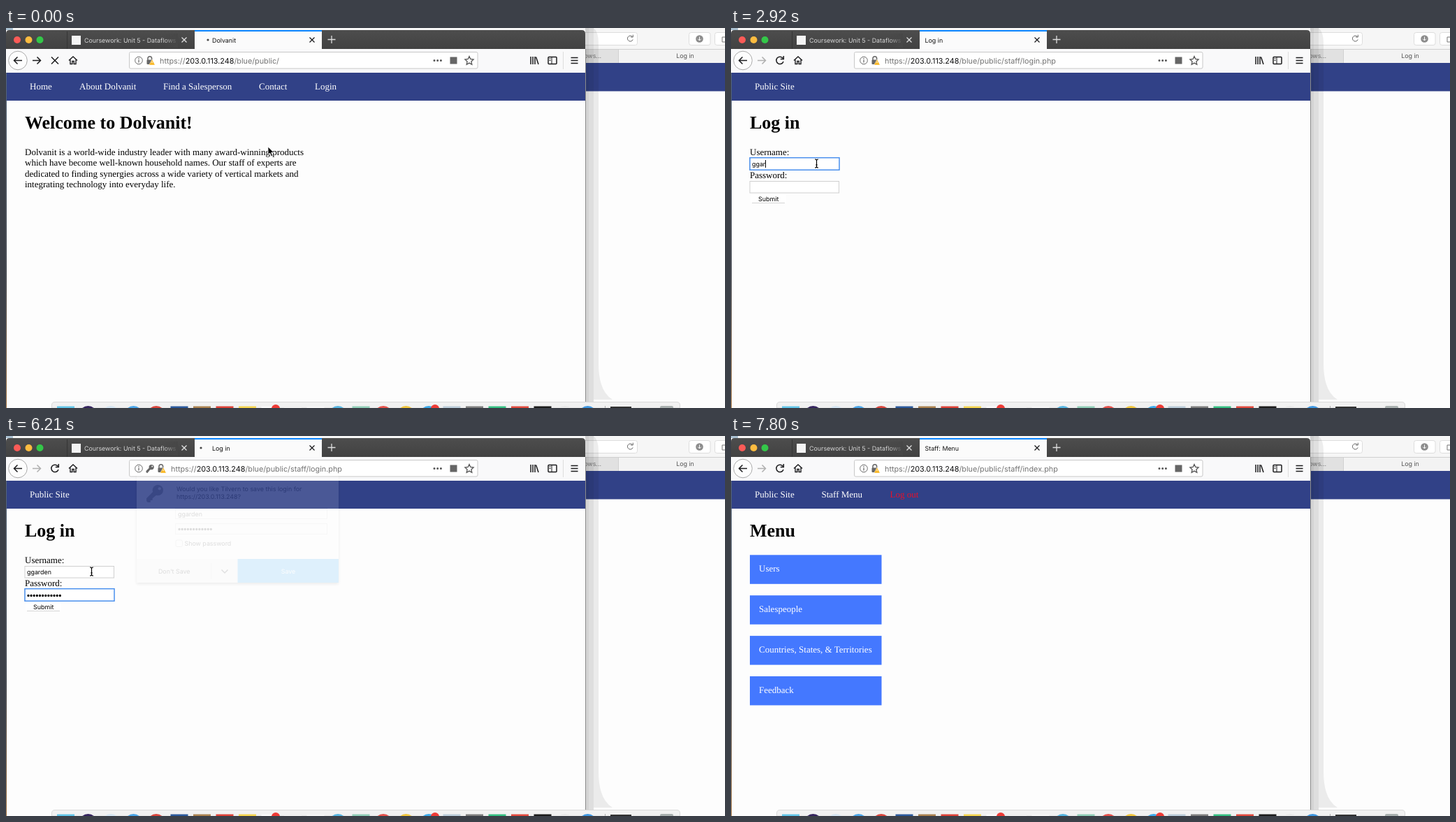
These frames come from a looping animation (1029x544 px, 8 s). An HTML page:

```html
<!DOCTYPE html>
<html lang="en">
<head>
<meta charset="utf-8">
<title>Login walkthrough</title>
<style>
  html, body { margin: 0; width: 100%; height: 100%; overflow: hidden; background: #fdfdfd; }
  svg { display: block; width: 100%; height: 100%; }
  text { white-space: pre; text-rendering: geometricPrecision; }
  .ui { font: 8.9px Inter, "Liberation Sans", sans-serif; }
  .url { font: 10.8px Inter, "Liberation Sans", sans-serif; fill: #737373; }
  .page { font: 13px "Liberation Serif", serif; }
  .page .title { font-weight: bold; font-size: 26px; }
  .nav, .tile { fill: #fff; }
  .line { fill: none; stroke: #1c1c1e; stroke-width: 1.5; }
  .field { fill: #fff; stroke: #d0d0d0; }
  .dots { stroke: #000; stroke-width: 3.3; stroke-linecap: round; stroke-dasharray: 0 4.12; }
</style>
</head>
<body>
<svg viewBox="0 0 1029 544" preserveAspectRatio="none">
  <defs>
    <linearGradient id="strip" x2="0" y2="1"><stop stop-color="#4d4d4d"/><stop offset="1" stop-color="#424242"/></linearGradient>
    <linearGradient id="fadeDark"><stop stop-color="#474747" stop-opacity="0"/><stop offset="1" stop-color="#474747"/></linearGradient>
    <linearGradient id="fadeLight"><stop stop-color="#fbfbfb" stop-opacity="0"/><stop offset="1" stop-color="#fbfbfb"/></linearGradient>
    <linearGradient id="desk" x2="0" y2="1"><stop stop-color="#56677b"/><stop offset=".6" stop-color="#3c4048"/><stop offset="1" stop-color="#a0713f"/></linearGradient>
    <clipPath id="tabA"><path d="M110 6h136v22H110z"/></clipPath>
    <clipPath id="tabB"><path d="M274 6h156v22H274z"/></clipPath>
    <filter id="drop" x="-10%" y="-10%" width="120%" height="125%"><feDropShadow dx="0" dy="2" stdDeviation="2" flood-opacity=".55"/></filter>
    <g id="key"><circle cx="17" cy="8" r="8"/><path d="M10 10l5 5-6 5v3H6v3H2l-2-2v-4z"/><circle cx="19.5" cy="5.5" r="2.2" fill="#fff"/></g>
  </defs>

  <rect width="1029" height="544" fill="#fdfdfd"/>

  <!-- window behind -->
  <g class="ui" fill="#555">
    <rect width="1029" height="30" fill="#f6f6f6"/>
    <path d="M0 0h10v3H0z" fill="#a9bfd0"/>
    <rect x="800" y="6.5" width="103.500" height="18" rx="3" fill="#fff" stroke="#ddd"/>
    <path d="M896.500 12.500a4 4 0 1 0 .7 4M894 13h3.300V9.700" fill="none" stroke="#666"/>
    <rect x="977.500" y="6.500" width="30.500" height="18" rx="3" fill="#fff" stroke="#ddd"/>
    <circle cx="992.500" cy="15.500" r="5.300" fill="#8c8c8c"/>
    <path d="M992.500 12.500v5.500m-2.300-2.300l2.300 2.300 2.300-2.300" fill="none" stroke="#fff"/>
    <rect x="1014.500" y="6.500" width="30" height="18" rx="3" fill="#fff" stroke="#ddd"/>
    <path d="M1030 13h-5v7h5" fill="none" stroke="#777"/>
    <rect x="829" y="30" width="48" height="20" fill="#e1e1e1"/>
    <rect x="877" y="30" width="152" height="20" fill="#f3f3f3"/>
    <path d="M829 30.500h200M876.500 30v20" stroke="#d0d0d0"/>
    <text x="852" y="43" text-anchor="end" fill="#777">lows...</text>
    <text x="972" y="43" text-anchor="middle">Log in</text>
    <rect x="829" y="50" width="200" height="40.500" fill="#314187"/>
    <path d="M829 0h5v544h-5z" fill-opacity=".16" fill="#000"/>
    <path d="M834 0h7v544h-7z" fill-opacity=".12" fill="#000"/>
    <path d="M841 0q7 6 7 22V480q0 40 20 52H841z" fill-opacity=".07" fill="#000"/>
  </g>

  <!-- front window -->
  <rect y="3" width="829" height="541" fill="#fdfdfd"/>
  <path d="M0 30V8q0-5 5-5h819q5 0 5 5v22z" fill="url(#strip)"/>
  <path d="M829.500 30V544" stroke="#8b8b8b"/>
  <circle cx="16" cy="17" r="5" fill="#fc5b57"/>
  <circle cx="32.500" cy="17" r="5" fill="#fdbc40"/>
  <circle cx="48.500" cy="17" r="5" fill="#34c749"/>
  <path d="M87.500 5v25" stroke="#353535"/>
  <rect x="94" y="11" width="13" height="13" fill="#f4f4f4"/>
  <g class="ui">
    <text x="112" y="20.500" fill="#d6d6d6" clip-path="url(#tabA)">Coursework: Unit 5 - Dataflows</text>
    <rect x="226" y="8" width="20" height="20" fill="url(#fadeDark)"/>
    <path d="M251.500 13.500l7 7m0-7l-7 7M466 11v11m-5.500-5.500h11" class="line" style="stroke:#ddd;stroke-width:1.300"/>
    <rect x="270" y="3" width="182" height="27" fill="#fbfbfb"/>
    <rect x="270" y="3" width="182" height="2" fill="#0a84ff"/>
    <text id="tab" y="20.500" fill="#111" clip-path="url(#tabB)"></text>
    <rect x="418" y="8" width="12" height="20" fill="url(#fadeLight)"/>
    <circle id="throb" cy="17" r="1.600" fill="#444"/>
    <path d="M434.500 13.500l7 7m0-7l-7 7" class="line" style="stroke-width:1.300"/>
  </g>

  <!-- toolbar -->
  <rect y="30" width="829" height="34" fill="#f9f9fa"/>
  <circle cx="17" cy="46.500" r="13.300" fill="#fdfdfd" stroke="#aaa"/>
  <path d="M23 46.500H11.500m5-5l-5 5 5 5" class="line"/>
  <path id="forward" d="M38 46.500h11.500m-5-5l5 5-5 5" class="line"/>
  <path id="stop" d="M65 41.500l10 10m0-10l-10 10" class="line"/>
  <path id="reload" d="M74.300 43.300a5.200 5.200 0 1 0 .7 4.700M75.300 40v4.500h-4.500" class="line"/>
  <path d="M90 46.500l6-5.500 6 5.500m-10-1v6h2.800v-4h2.400v4h2.800v-6" class="line" style="stroke-width:1.400"/>
  <rect x="176.500" y="34.500" width="498.500" height="23.500" rx="2" fill="#fff" stroke="#c8c8c8"/>
  <circle cx="190" cy="46.500" r="5.300" fill="none" stroke="#6b6b6b"/>
  <path d="M190 45.500v4M190 43v1.400" stroke="#6b6b6b" stroke-width="1.300"/>
  <use id="keySmall" href="#key" fill="#666" transform="translate(200.500 41) scale(.45)"/>
  <g id="lock">
    <path d="M203 46v-2.500a2.800 2.800 0 0 1 5.600 0V46" fill="none" stroke="#666" stroke-width="1.500"/>
    <rect x="201.500" y="45.500" width="8" height="6.500" rx="1" fill="#666"/>
    <path d="M209 45l4.300 8h-8.600z" fill="#f9b51c" stroke="#fff" stroke-width=".5"/>
    <path d="M209 48v2.300" stroke="#fff"/>
  </g>
  <text id="url" class="url" y="50.500">https://<tspan fill="#0c0c0d">203.0.113.248</tspan><tspan id="path"></tspan></text>
  <path d="M613 46.500h0m4.700 0h0m4.700 0h0" stroke="#555" stroke-width="3" stroke-linecap="round"/>
  <rect x="635.500" y="41.500" width="10" height="10" fill="#666"/>
  <path d="M663 40.500l1.800 4 4.300.5-3.200 3 .9 4.300-3.800-2.200-3.800 2.200.9-4.300-3.200-3 4.300-.5z" class="line" style="stroke:#555;stroke-width:1.300"/>
  <path d="M751 41v11m3-11v11m3-11v11m1.500-10.500l3.500 10.500" class="line"/>
  <rect x="776" y="41.500" width="12" height="10" rx="1" class="line"/>
  <path d="M781 41v11m-3.500-8h2m-2 2.500h2" class="line" style="stroke-width:1"/>
  <path d="M797.500 34v25" stroke="#ddd"/>
  <path d="M808.500 42.500h10m-10 4h10m-10 4h10" class="line"/>

  <!-- pages -->
  <rect y="64" width="829" height="40" fill="#314187"/>
  <g id="home" class="page">
    <g class="nav">
      <text x="34" y="88">Home</text><text x="105" y="88">About Dolvanit</text>
      <text x="225" y="88">Find a Salesperson</text><text x="362" y="88">Contact</text><text x="442" y="88">Login</text>
    </g>
    <text x="27" y="143.500" class="title">Welcome to Dolvanit!</text>
    <text x="27" y="181.500">Dolvanit is a world-wide industry leader with many award-winning products</text>
    <text x="27" y="197">which have become well-known household names. Our staff of experts are</text>
    <text x="27" y="212.500">dedicated to finding synergies across a wide variety of vertical markets and</text>
    <text x="27" y="228.300">integrating technology into everyday life.</text>
  </g>
  <g id="login" class="page">
    <text x="34" y="88" class="nav">Public Site</text>
    <text x="27" y="143.500" class="title">Log in</text>
    <text x="27" y="181.500">Username:</text>
    <text x="27" y="214.500">Password:</text>
    <rect x="27" y="186.500" width="127.500" height="16.500" class="field"/>
    <rect x="27" y="219.500" width="127.500" height="16.500" class="field"/>
    <rect id="focus" x="27" width="128" height="17.500" fill="#fff" stroke="#4a90ee" stroke-width="1.500"/>
    <text id="user" class="ui" x="30" y="198"></text>
    <path id="secret" class="dots"/>
    <path id="caret" stroke="#000"/>
    <rect x="28" y="238.500" width="51" height="12" rx="2.500" fill="#fff"/>
    <path d="M30 250.500h47" stroke="#d4d4d4"/>
    <text class="ui" x="53.700" y="247.500" text-anchor="middle">Submit</text>
  </g>
  <g id="menu" class="page">
    <g class="nav"><text x="34" y="88">Public Site</text><text x="129.500" y="88">Staff Menu</text></g>
    <text x="227.500" y="88" fill="#e8102a">Log out</text>
    <text x="27" y="143.500" class="title">Menu</text>
    <g id="tiles"></g>
  </g>

  <!-- save prompt -->
  <g id="prompt" class="ui">
    <path d="M187 61h13l7-6 7 6h262v154H187z" fill="#fff" filter="url(#drop)"/>
    <use href="#key" fill="#737373" transform="translate(201 75) scale(.96)"/>
    <text x="244" y="84">Would you like Tilvern to save this login for</text>
    <text x="244" y="95">https://203.0.113.248?</text>
    <rect x="242.500" y="108.500" width="217" height="15" class="field"/>
    <rect x="242.500" y="130.500" width="217" height="15" class="field"/>
    <text x="246" y="119.500">ggarden</text>
    <path class="dots" d="M248 138.500h46"/>
    <rect x="243" y="154" width="9.500" height="9.500" rx="2" fill="#fff" stroke="#bbb"/>
    <text x="255.500" y="162">Show password</text>
    <rect x="187" y="181" width="144.500" height="34" fill="#ededed"/>
    <rect id="hover" x="187" y="181" width="107.500" height="34" fill="#dadada"/>
    <path d="M293.500 187v23" stroke="#cfcfcf"/>
    <path d="M308.500 196.500l4.500 4.500 4.500-4.500" class="line"/>
    <rect x="331.500" y="181" width="144.500" height="34" fill="#0996f8"/>
    <text x="240.700" y="202" text-anchor="middle">Don't Save</text>
    <text x="404" y="202" text-anchor="middle" fill="#fff">Save</text>
  </g>

  <rect y="64" width="1" height="480" fill="url(#desk)"/>
  <g id="dock" class="ui">
    <path d="M65.500 544v-4q0-4.500 4.500-4.500h890q4.500 0 4.500 4.500v4z" fill="#f1f1f1" stroke="#d9d9d9"/>
  </g>

  <!-- pointers -->
  <path id="arrow" d="M0 0v11.500l2.700-2.400 2 4.600 2-.9-2-4.500H8.300z" fill="#000" stroke="#fff" stroke-width=".8"/>
  <path id="beam" d="M-2.500-6Q0-6 0-4.500Q0-6 2.500-6M0-4.500V4.500M-2.500 6Q0 6 0 4.500Q0 6 2.500 6M-1.300 2h2.600" fill="none" stroke="#000" stroke-width="1.200"/>
  <path id="hand" d="M-2.500-6q1.300-.7 1.900.6L.6-2.300l3.600.6q1.300.4 1.100 2L4.600 3.500 4 6H-1.500L-5 1q-.3-1.400 1.200-1l1.600 1.400L-3.500-4.500Q-3.600-5.700-2.500-6z" fill="#fff" stroke="#000" stroke-width="1.100"/>
</svg>
<script>
const LOOP = 8000, USER = "ggarden";
const $ = id => document.getElementById(id);
const show = (id, on) => $(id).style.display = on ? "" : "none";

["Users", "Salespeople", "Countries, States, & Territories", "Feedback"].forEach((label, i) => {
  const y = 170.3 + i * 57.9;
  $("tiles").insertAdjacentHTML("beforeend",
    `<rect x="27" y="${y}" width="188.500" height="41.500" fill="#4478ff"/>
     <text class="tile" x="40" y="${y + 24}">${label.replace("&", "&amp;")}</text>`);
});

// Dock items sit on a regular pitch; only their tops show.
const dockColors = ("#62c5e8 #35245e #d5e5f2 #4aa5e8 #d9453c #2c5a9c #a9814f #dc4238 #f4d44e #fafafa #f0f0f0 " +
  "#f6f6f6 #55b4e0 #8fcdb6 #e4514b #f0c53c #3ba9ea #b9cbd8 #7c7c7c #35bf82 #e04a3e #1d1d1d #e8e8e8 #3e96e0").split(" ");
const roundItems = [1, 2, 3, 4, 12, 14, 15, 16, 22, 23];
let dock = "";
dockColors.forEach((color, i) => {
  const x = 85 + i * 32.5;
  dock += roundItems.includes(i)
    ? `<circle cx="${x}" cy="554" r="13" fill="${color}"/>`
    : `<rect x="${x - 12}" y="541.500" width="25" height="9" fill="${color}"/>`;
});
dock += `<circle cx="386" cy="545" r="6" fill="#ee3b36"/><circle cx="614" cy="545" r="6" fill="#ee3b36"/>
  <path d="M857.500 541v3" stroke="#aaa"/><rect x="865" y="542" width="30" height="4" fill="#333"/>
  <rect x="936" y="541" width="19" height="5" rx="2" fill="#a9b0af"/>`;
$("dock").insertAdjacentHTML("beforeend", dock);

// Each step changes only the listed parts of the state.
const steps = [
  [0, { page: "home", tab: "Dolvanit", dot: 289, load: "stop", forward: true, path: "", pointer: ["arrow", 375, 170],
        key: false, typed: 0, secret: 0, focus: "", caret: false, prompt: 0, hover: false }],
  [180, { dot: 283, pointer: ["arrow", 374, 188] }],
  [480, { dot: 0, load: "reload", pointer: ["arrow", 400, 150] }],
  [630, { pointer: ["arrow", 438, 108] }],
  [780, { pointer: ["hand", 456, 87] }],
  [930, { dot: 283, load: "stop" }],
  [1100, { page: "login", tab: "Log in", dot: 0, load: "reload", forward: false, path: "staff/login.php", pointer: ["arrow", 400, 105] }],
  [1280, { pointer: ["arrow", 210, 170] }],
  [1430, { pointer: ["beam", 122.5, 194] }],
  [1570, { focus: "user", caret: true }],
  [2020, { caret: false }],
  [2320, { typed: 1, caret: true }],
  ...[2, 3, 4, 5, 6, 7].map(n => [2320 + n * 150, { typed: n }]),
  [3820, { caret: false }],
  [4270, { focus: "secret", caret: true }],
  [4870, { caret: false }],
  [5310, { secret: 5, caret: true }],
  [5460, { secret: 9 }],
  [5610, { secret: 12 }],
  [5910, { caret: false }],
  [6210, { key: true, dot: 279, prompt: .12 }],
  [6390, { prompt: 1, caret: true, dot: 289 }],
  [6600, { tab: "203.0.113.248/blue/public/staff/", path: "staff/index.php", load: "stop", dot: 280 }],
  [6810, { dot: 285, pointer: ["hand", 131, 200] }],
  [7050, { page: "menu", tab: "Staff: Menu", dot: 0, load: "idle" }],
  [7260, { pointer: ["arrow", 190, 194], hover: true }],
  [7470, { pointer: ["arrow", 219.5, 191] }],
  [7650, { prompt: .5 }],
  [7800, { prompt: 0, key: false, load: "reload", pointer: ["none"] }]
];

function render(s) {
  for (const id of ["home", "login", "menu"]) show(id, s.page === id);
  $("tab").textContent = s.tab;
  $("tab").setAttribute("x", s.dot ? 295 : 277.5);
  show("throb", s.dot);
  $("throb").setAttribute("cx", s.dot);
  show("stop", s.load === "stop");
  show("reload", s.load !== "stop");
  $("reload").style.stroke = s.load === "idle" ? "#b5b5b5" : "";
  $("forward").style.stroke = s.forward ? "" : "#b0b0b0";
  $("path").textContent = "/blue/public/" + s.path;
  $("url").setAttribute("x", s.key ? 236 : 220);
  $("lock").setAttribute("transform", `translate(${s.key ? 16 : 0})`);
  show("keySmall", s.key);

  $("user").textContent = USER.slice(0, s.typed);
  $("secret").setAttribute("d", s.secret ? `M32 228.500h${s.secret * 4.12 - 3}` : "");
  const inUser = s.focus === "user";
  show("focus", s.focus);
  $("focus").setAttribute("y", inUser ? 185.7 : 218.7);
  show("caret", s.caret);
  if (s.page === "login") {
    const width = inUser ? $("user").getComputedTextLength() : s.secret * 4.12;
    $("caret").setAttribute("d", `M${Math.round(30 + width) + .5} ${inUser ? 189 : 222}v11`);
  }

  show("prompt", s.prompt);
  show("hover", s.hover);
  $("prompt").style.opacity = s.prompt;
  $("prompt").setAttribute("transform", `translate(0 ${s.prompt < 1 ? -5 : 0})`);

  const [kind, x, y] = s.pointer;
  for (const id of ["arrow", "beam", "hand"]) show(id, id === kind);
  if (kind !== "none") $(kind).setAttribute("transform", `translate(${x} ${y})`);
}

let shown = -1;
function tick() {
  const t = performance.now() % LOOP;
  const index = steps.findLastIndex(([at]) => at <= t);
  if (index !== shown) {
    render(Object.assign({}, ...steps.slice(0, index + 1).map(([, change]) => change)));
    shown = index;
  }
  requestAnimationFrame(tick);
}
tick();
</script>
</body>
</html>
```
